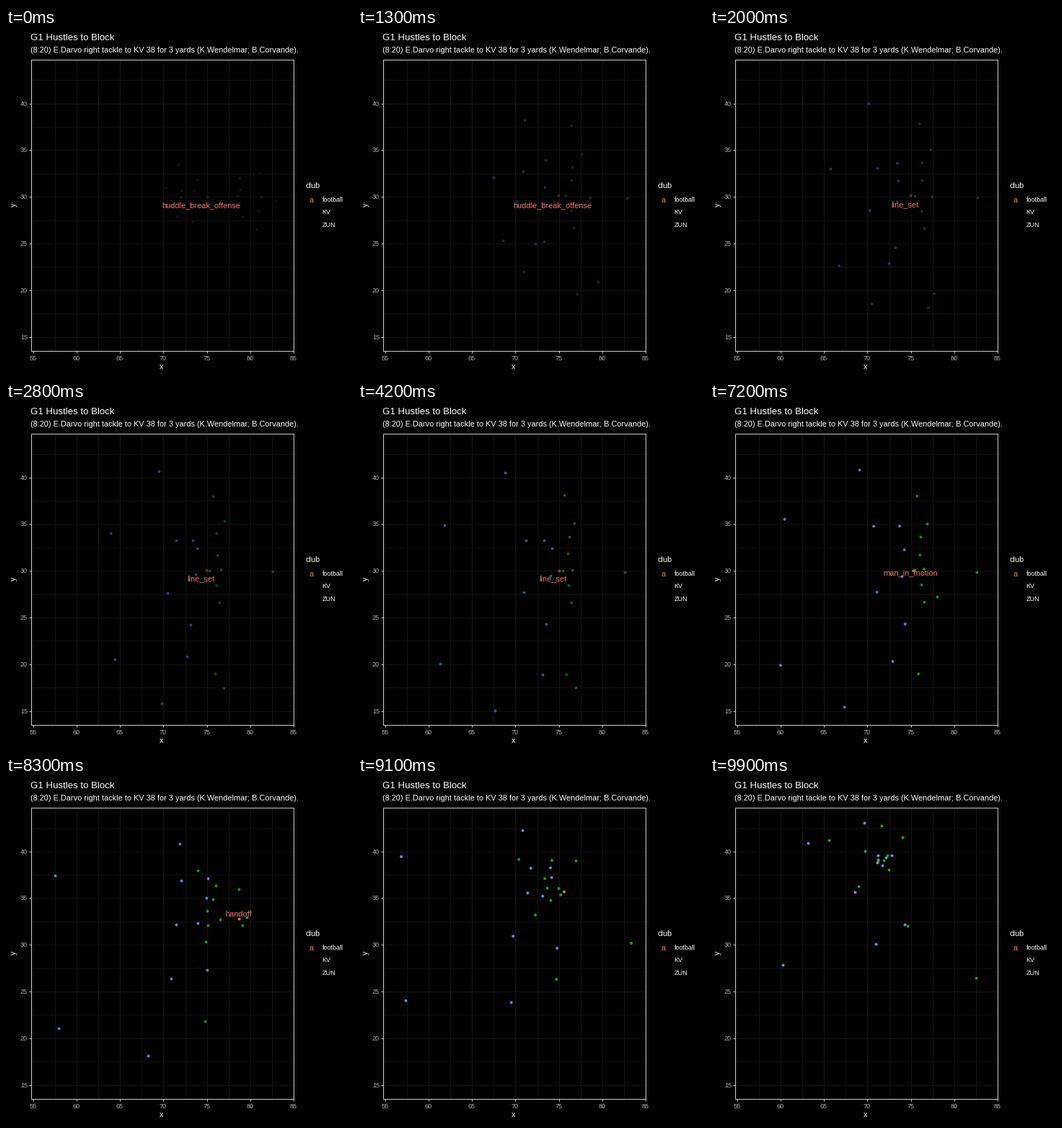
A matplotlib script that plays this animation: 480x480 px, repeating every 10 s.

```python
import numpy as np
import matplotlib.pyplot as plt
from matplotlib.animation import FuncAnimation

SIZE, DPI = 480, 72
FRAMES, STEP = 100, 100
BALL, GREEN, BLUE = "#F8766D", "#00BA38", "#619CFF"
BORDER, TICK_TEXT, GRID = "#CCCCCC", "#B3B3B3", "#141414"
PANEL = (34, 43, 398, 447)  # left, top, right, bottom

plt.rcParams["font.family"] = "Liberation Sans"

# One track per dot: 11 defenders, 11 attackers, then the ball.
tracks = [[] for _ in range(23)]


def pose(ms, defence, offence, ball):
    for track, (x, y) in zip(tracks, defence + offence + [ball]):
        track.append((ms, x, y))


def hold(ms, moved):
    """Repeat the last pose, except for the dots that have moved."""
    for i, track in enumerate(tracks):
        track.append((ms, *moved.get(i, track[-1][1:])))


def via(i, ms, x, y):
    tracks[i].append((ms, x, y))


# Huddle
pose(0,
     [(239, 189), (222, 221), (243, 225), (265, 210), (260, 226), (256, 245),
      (242, 235), (259, 269), (244, 255), (228, 246), (237, 261)],
     [(324, 208), (352, 200), (343, 203), (325, 224), (321, 233), (354, 234),
      (374, 240), (318, 246), (328, 262), (347, 279), (350, 254)],
     (279, 234))
via(17, 600, 380, 238)
# Walking to the line
pose(1300,
     [(231, 128), (188, 207), (229, 199), (260, 183), (259, 221), (257, 243),
      (220, 240), (258, 296), (246, 299), (201, 295), (230, 338)],
     [(296, 135), (310, 175), (297, 193), (296, 211), (288, 232), (322, 235),
      (373, 236), (296, 253), (299, 277), (333, 352), (304, 369)],
     (278, 232))
via(0, 2200, 217, 101)
via(10, 2200, 222, 393)
# Lined up
pose(2800,
     [(212, 96), (145, 182), (236, 192), (259, 192), (265, 203), (263, 239),
      (224, 265), (256, 309), (251, 353), (151, 357), (216, 418)],
     [(287, 131), (303, 165), (292, 182), (293, 212), (282, 234), (298, 232),
      (370, 235), (292, 254), (296, 278), (290, 377), (302, 397)],
     (278, 233))
pose(4200,
     [(204, 98), (120, 171), (233, 192), (258, 192), (269, 203), (267, 241),
      (230, 264), (261, 308), (256, 378), (114, 363), (190, 428)],
     [(286, 129), (300, 168), (293, 187), (291, 210), (284, 234), (297, 233),
      (370, 236), (292, 254), (296, 278), (289, 378), (302, 396)],
     (279, 234))
# Motion man starts
pose(5800,
     [(202, 95), (109, 168), (224, 180), (260, 181), (269, 205), (266, 242),
      (231, 264), (270, 308), (259, 376), (103, 366), (186, 426)],
     [(287, 130), (301, 169), (292, 187), (291, 212), (284, 233), (296, 232),
      (370, 236), (293, 254), (297, 278), (289, 377), (302, 396)],
     (278, 234))
# Snap
hold(7100, {0: (206, 94), 1: (104, 163), 2: (226, 173), 3: (262, 173),
            8: (254, 362), 9: (98, 365), 10: (186, 424), 21: (314, 280)})
via(1, 7700, 91, 154)
via(9, 7700, 90, 361)
via(10, 7700, 189, 407)
via(17, 7600, 368, 235)
via(22, 7400, 297, 232)
via(22, 7900, 327, 213)
# Handoff
pose(8300,
     [(241, 94), (68, 138), (243, 145), (280, 142), (278, 169), (266, 204),
      (236, 206), (279, 269), (229, 281), (73, 350), (197, 388)],
     [(266, 131), (291, 152), (287, 171), (279, 187), (280, 207), (334, 196),
      (328, 207), (297, 199), (277, 230), (276, 340), (323, 157)],
     (323, 198))
via(1, 8850, 51, 118)
via(9, 8850, 62, 325)
via(10, 8800, 206, 343)
via(0, 8800, 233, 80)
via(16, 9250, 381, 240)
# Tackle
pose(9900,
     [(214, 65), (136, 93), (233, 110), (244, 113), (252, 110), (239, 124),
      (233, 116), (270, 206), (201, 161), (101, 262), (230, 233)],
     [(165, 89), (238, 69), (215, 104), (241, 117), (248, 130), (369, 280),
      (233, 118), (246, 110), (206, 153), (274, 208), (267, 85)],
     (232, 120))


def glide(keys, t):
    """Monotone cubic path through (ms, x, y) keys, sampled at times t."""
    k = np.array(keys, float)
    k = k[np.argsort(k[:, 0])]
    ms, p = k[:, 0], k[:, 1:]
    h = np.diff(ms)[:, None]
    d = np.diff(p, axis=0) / h
    m = np.zeros_like(p)
    m[0], m[-1] = d[0], d[-1]
    same = d[:-1] * d[1:] > 0
    total = np.where(same, d[:-1] + d[1:], 1)
    m[1:-1] = np.where(same, 2 * d[:-1] * d[1:] / total, 0)
    j = np.clip(np.searchsorted(ms, t, "right") - 1, 0, len(h) - 1)
    s = (t - ms[j])[:, None] / h[j]
    return ((1 + 2 * s) * (1 - s) ** 2 * p[j] + s * (1 - s) ** 2 * h[j] * m[j]
            + s * s * (3 - 2 * s) * p[j + 1] + s * s * (s - 1) * h[j] * m[j + 1])


times = np.arange(FRAMES) * STEP
paths = np.stack([glide(track, times) for track in tracks], axis=1)
alphas = np.linspace(0.1, 1, FRAMES)

fig = plt.figure(figsize=(SIZE / DPI, SIZE / DPI), dpi=DPI, facecolor="black")
ax = fig.add_axes([0, 0, 1, 1])
ax.set(xlim=(-0.5, SIZE - 0.5), ylim=(SIZE - 0.5, -0.5))
ax.axis("off")


def line(xs, ys, color, z=1):
    ax.plot(xs, ys, color=color, lw=1, zorder=z, solid_capstyle="butt")


def label(x, y, s, size=11, color="white", **kw):
    return ax.text(x, y, s, fontsize=size, color=color, va="baseline", **kw)


left, top, right, bottom = PANEL
for i in range(13):
    x = round(37 + 30.08 * i)
    line([x, x], [top, bottom], GRID)
    if i % 2 == 0:
        line([x, x], [bottom, bottom + 3], BORDER)
        label(x, 460.5, str(55 + 5 * i // 2), 9, TICK_TEXT, ha="center")
for i in range(12):
    y = round(427.5 - 32.4 * i)
    line([left, right], [y, y], GRID)
    if i % 2 == 0:
        line([left - 3, left], [y, y], BORDER)
        label(29.5, y + 3.5, str(15 + 5 * i // 2), 9, TICK_TEXT, ha="right")
line([left, right, right, left, left], [top, top, bottom, bottom, top], BORDER, 2)

label(33.5, 16.5, "G1 Hustles to Block", 13.2)
label(33.5, 33.5, "(8:20) E.Darvo right tackle to KV 38 for 3 yards "
      "(K.Wendelmar; B.Corvande).")
label(215.5, 472.5, "x", ha="center")
label(13.5, 245, "y", ha="center", rotation=90, rotation_mode="anchor")
label(415.5, 221.5, "club")
label(423, 241.5, "a", color=BALL, ha="center")
for y, name in zip((241, 258, 276), ("football", "KV", "ZUN")):
    label(438, y - 0.5, name, 9)

colors = [BLUE] * 11 + [GREEN] * 11 + [BALL]
dots = ax.scatter(*paths[0].T, s=8.4, c=colors, edgecolors=colors,
                  linewidths=1, zorder=3)
event = label(270, 248.5, "", color=BALL, ha="center", zorder=4)

EVENTS = [(0, "huddle_break_offense"), (2000, "line_set"),
          (5000, "man_in_motion"), (7300, "handoff"), (9000, "")]


def draw(i):
    ms = times[i]
    dots.set_offsets(paths[i])
    dots.set_alpha(float(alphas[i]))
    event.set_text([name for start, name in EVENTS if start <= ms][-1])
    event.set_position((
        np.interp(ms, [0, 1300, 7000, 8300, 9000], [270.5, 269.5, 269.5, 322, 285]),
        np.interp(ms, [1300, 2000, 7000, 8300, 9000], [248.5, 248, 248, 194.5, 160])))
    return dots, event


anim = FuncAnimation(fig, draw, frames=FRAMES, interval=STEP,
                     repeat=True, repeat_delay=0)
plt.show()
```
